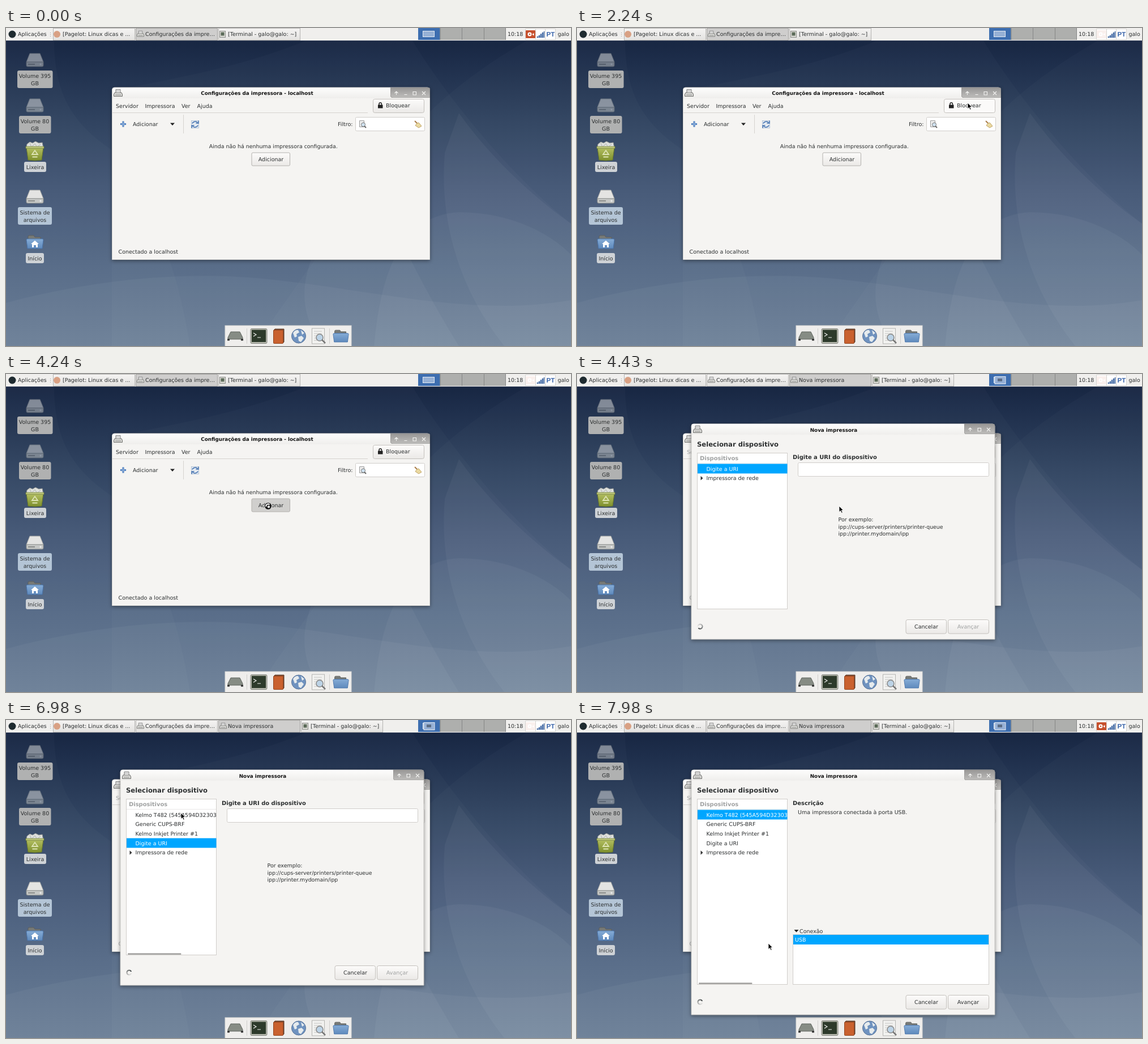
An HTML page for the animation above (8000 ms loop, 998 px wide and 561 px high).

```html
<!DOCTYPE html>
<html lang="pt">
<head>
<meta charset="utf-8">
<title>Configurações da impressora</title>
<style>
html, body { margin: 0; width: 100%; height: 100%; overflow: hidden; }
svg { display: block; }
#stage { width: 100vw; height: 100vh; }
text { font: 9.5px "DejaVu Sans", sans-serif; fill: #2c2f30; text-rendering: geometricPrecision; white-space: pre; }
.mid { text-anchor: middle; }
.title { font-size: 8.77px; font-weight: bold; fill: #111; text-anchor: middle; }
.bold { font-size: 9.95px; font-weight: bold; }
.big { font-size: 11.6px; font-weight: bold; }
.small { font-size: 9.35px; }
.window { filter: drop-shadow(0 2px 3px rgba(0,0,0,.4)); }
.button { fill: url(#buttonFill); stroke: #c3c0bc; }
.field { fill: #fff; stroke: #d0cdca; }
.line { fill: none; stroke: #d5d2cf; }
.task { fill: url(#panelFill); stroke: #b4b3b1; }
.pressed { fill: #cfcecd; stroke: #a3a2a0; }
.disabled text { fill: #a3a5a5; }
text.off { fill: #a0a2a2; }
text.on { fill: #fff; }
.mark { fill: none; stroke: #f4f4f2; stroke-width: 1.1; }
.shade path { fill: #fff; opacity: .04; }
.shade .faint { opacity: .02; }
</style>
</head>
<body>
<svg id="stage" viewBox="0 0 998 561" preserveAspectRatio="none">
<defs>
  <linearGradient id="sky" x2="0" y2="1">
    <stop offset="0" stop-color="#14223d"/><stop offset=".1" stop-color="#1d2d4a"/>
    <stop offset=".3" stop-color="#314461"/><stop offset=".5" stop-color="#435775"/>
    <stop offset=".75" stop-color="#566a87"/><stop offset="1" stop-color="#677b94"/>
  </linearGradient>
  <linearGradient id="panelFill" x2="0" y2="1"><stop stop-color="#f5f4f3"/><stop offset="1" stop-color="#e3e2e0"/></linearGradient>
  <linearGradient id="buttonFill" x2="0" y2="1"><stop stop-color="#fcfbfa"/><stop offset="1" stop-color="#ebe9e7"/></linearGradient>
  <linearGradient id="titleFill" x2="0" y2="1"><stop stop-color="#fdfdfc"/><stop offset="1" stop-color="#efeeec"/></linearGradient>
  <linearGradient id="controlFill" x2="0" y2="1"><stop stop-color="#989796"/><stop offset="1" stop-color="#bebdbb"/></linearGradient>
  <linearGradient id="folderFill" x2="0" y2="1"><stop stop-color="#85acd6"/><stop offset="1" stop-color="#5f8abd"/></linearGradient>
  <linearGradient id="binFill" x2="0" y2="1"><stop stop-color="#b4bf62"/><stop offset="1" stop-color="#7d8f2c"/></linearGradient>

  <symbol id="printer" viewBox="0 0 16 16" width="16" height="16" overflow="visible">
    <path d="M4 7V1.500h8V7" fill="#fff" stroke="#777"/>
    <path d="M2 7h12l1.500 3v3.500h-15V10z" fill="#d8d8d5" stroke="#6e6f6c"/>
    <path d="M3 11h10M4 4h7" stroke="#888"/>
  </symbol>
  <symbol id="drive" viewBox="0 0 32 26" width="32" height="26">
    <path d="M7 1h18l6 15H1z" fill="#e4e4e2" stroke="#a4a6a4"/>
    <path d="M1 16h30v6q0 2-2 2H3q-2 0-2-2z" fill="#c6c8c6" stroke="#8d908e"/>
    <path d="M4 20h12" stroke="#8a8c8a" stroke-width="2"/><circle cx="26" cy="20" r="1.500" fill="#eee"/>
  </symbol>
  <symbol id="folder" viewBox="0 0 32 28" width="32" height="28">
    <path d="M4 21V4q0-2 2-2h8l2 3h10v16z" fill="#777a77" stroke="#5c5e5c"/>
    <path d="M1 10q0-2 2-2h26q2 0 2 2l-2 15H3z" fill="url(#folderFill)" stroke="#4a74aa"/>
  </symbol>
  <symbol id="controls" viewBox="0 0 70 18" width="70" height="18">
    <path d="M0 0h66q4 0 4 4v14H5q-5 0-5-5z" fill="url(#controlFill)" stroke="#8f8e8c"/>
  </symbol>
</defs>

<rect width="998" height="561" fill="url(#sky)"/>
<g class="shade">
  <path class="faint" d="M0 22H85C86 110 112 165 187 215C250 300 300 400 325 561H0z"/>
  <path class="faint" d="M187 110C330 85 440 60 530 22H718C770 110 890 260 998 345V561H187z"/>
  <path class="faint" d="M920 22C820 80 730 150 660 250C560 390 500 470 440 561H998V22z"/>
  <path d="M0 485C150 445 320 425 480 445C660 465 830 510 998 480V561H0z"/>
  <path d="M650 561C660 450 690 330 800 325C900 325 970 370 998 400V561z"/>
  <path d="M640 240C690 370 750 480 800 561H560C500 480 520 400 640 240z"/>
  <path d="M775 220C765 340 800 460 880 561H998V345C920 290 850 220 800 150z"/>
</g>

<!-- desktop icons -->
<g>
  <use href="#drive" x="35" y="44" opacity=".5"/><use href="#drive" x="35" y="124" opacity=".5"/><use href="#drive" x="35" y="285"/>
  <rect x="20" y="75" width="62.500" height="31" rx="3" fill="#b0b1b1"/>
  <rect x="23" y="155" width="56.500" height="31" rx="3" fill="#b0b1b1"/>
  <rect x="32" y="236" width="39" height="18" rx="3" fill="#ced2d6"/>
  <rect x="21" y="316" width="60" height="31" rx="3" fill="#b4c5d6"/>
  <rect x="35" y="397" width="32" height="18" rx="3" fill="#ced2d6"/>
  <text class="mid" x="51" y="87.500">Volume 395</text><text class="mid" x="51" y="100.500">GB</text>
  <text class="mid" x="51" y="168">Volume 80</text><text class="mid" x="51" y="181">GB</text>
  <text class="mid" x="51.500" y="248.500">Lixeira</text>
  <text class="mid" x="51" y="329">Sistema de</text><text class="mid" x="51" y="341.500">arquivos</text>
  <text class="mid" x="51" y="409.500">Início</text>
  <path d="M36 212l1-7 5-4 5 2 5-3 6 3 6-1 2 10z" fill="#dfe1de" stroke="#979a96"/>
  <path d="M42 203l3 7 6-6 4 6 6-5" fill="none" stroke="#aeb1ad"/>
  <path d="M36 211h30l-3 22q-12 2-24 0z" fill="url(#binFill)" stroke="#66742b"/>
  <path d="M35 209h32v3.500H35z" fill="#b9c279" stroke="#77843a" stroke-width=".7"/>
  <path d="M46 223l5-7 5 7zM46.500 227.500h9" fill="none" stroke="#dde3b4" stroke-width="1.800"/>
  <use href="#folder" x="35" y="364"/>
  <path d="M44 381l7-6 7 6h-2v6h-3v-4h-4v4h-3v-6z" fill="#fff"/>
</g>

<!-- dock -->
<g>
  <rect x="387" y="525" width="223" height="38" fill="#efeeec" stroke="#d8d7d5"/>
  <path d="M425.500 530v27M571.500 530v27" stroke="#cfcecc"/>
  <path d="M397 536h16l5 10v3h-26v-3z" fill="#868c84" stroke="#5f645e"/><path d="M391 550h4m20 0h4" stroke="#333" stroke-width="3"/>
  <rect x="432" y="530.500" width="29" height="26" rx="2" fill="#b9bbb0" stroke="#80827c"/>
  <rect x="434" y="532.500" width="25" height="21.500" fill="#2d3a2b"/>
  <path d="M437 538l5 3-5 3M444 546h6" class="mark"/>
  <path d="M473 533l2-2h16v23l-2 2z" fill="#7c4a30" stroke="#5d3a28"/><rect x="472.500" y="533" width="17" height="23.500" rx="1" fill="#c9612f" stroke="#93451f"/>
  <circle cx="517" cy="543.500" r="12.500" fill="#6f92bf" stroke="#587397"/>
  <path d="M507 538q4-6 9-5l2 4-5 3 1 4-4 2zM516 545l6-2 4 4-5 7-4-2zM521 533l6 5-4 3z" fill="#e6ebed"/>
  <rect x="540.500" y="530" width="22" height="27" fill="#f2f2f0" stroke="#b3b4b1"/>
  <path d="M544 535h14M544 539h14M544 543h4M544 547h4M544 551h6" stroke="#c4c4c2"/>
  <circle cx="554" cy="546" r="6" fill="#bcd3e6" stroke="#888" stroke-width="1.500"/><path d="M558 550l6 6" stroke="#777" stroke-width="2.500"/>
  <use href="#folder" x="577" y="530" width="29"/>
</g>

<!-- top panel -->
<g>
  <rect width="998" height="22" fill="#f0efed"/><path d="M0 22.500h998" stroke="#38455f"/>
  <circle cx="11" cy="11" r="6.500" fill="#1f2b30"/>
  <text x="21" y="14">Aplicações</text>
  <path d="M78.500 8v8" stroke="#999" stroke-dasharray="1 2"/>
  <rect class="task" x="83.500" y=".5" width="144" height="21"/><circle cx="90" cy="11" r="6" fill="#d9a184"/>
  <text x="100" y="14">[Pagelot: Linux dicas e ...</text>
  <rect id="settingsTask" class="task" x="229.500" y=".5" width="144" height="21"/><use href="#printer" x="231" y="4" width="13" height="13"/>
  <text x="246" y="14">Configurações da impre…</text>
  <g id="newTask">
    <rect class="task pressed" x="375.500" y=".5" width="144" height="21"/><use href="#printer" x="377" y="4" width="13" height="13"/>
    <text x="392" y="14">Nova impressora</text>
  </g>
  <g id="terminalTask">
    <rect class="task" x="375.500" y=".5" width="144" height="21"/>
    <rect x="377.500" y="5.500" width="10" height="11" fill="#dcdcd6" stroke="#8b8c88"/><rect x="379.500" y="7.500" width="6" height="6" fill="#5b6a58"/>
    <text x="392" y="14">[Terminal - galo@galo: ~]</text>
  </g>
  <rect x="728" y="0" width="154.500" height="21" fill="#aeafad"/><rect x="728" width="38.500" height="21" fill="#3d6eb0"/>
  <path d="M767 0v21M805.500 0v21M844.500 0v21M882.500 0v21" stroke="#858685"/>
  <rect x="736.500" y="5.500" width="20" height="10" fill="#96b0d5" stroke="#e3eaf3"/>
  <rect id="miniDialog" x="738" y="4.500" width="19" height="13" fill="#96b0d5" stroke="#e3eaf3"/><rect id="miniIcon" x="743" y="8" width="8" height="5" fill="#5c6d86"/>
  <text x="886" y="14">10:18</text>
  <path d="M917.500 1.500h53v19h-53zM935.500 1.500v19M952.500 1.500v19" fill="#fff" stroke="#d5d3d0"/>
  <g id="tray"><rect x="918" y="4" width="17" height="14" rx="1" fill="#c6502d"/><circle cx="925" cy="11" r="3.500" fill="#fff"/><circle cx="925" cy="11" r="1.300" fill="#c6502d"/><path d="M930 10.500l2.500-1.500v4.500l-2.500-1.500z" fill="#fff"/></g>
  <path d="M938 15h2v2h-2zM941 13h2v4h-2zM944 10.500h2v6.500h-2zM947 8h2v9h-2zM950 6h1v11h-1z" fill="#4a73ae" stroke="#3a5f94" stroke-width=".5"/>
  <text x="954.500" y="15" style="font:bold 11.500px 'Liberation Sans',sans-serif;fill:#3c66aa">PT</text>
  <text x="974.500" y="14">galo</text>
</g>

<!-- settings window -->
<g class="window" id="settings">
  <path d="M187.500 408.500V109q0-4 4-4h553q4 0 4 4v299.500z" fill="#f5f4f2" stroke="#d6d5d2"/>
  <path d="M188 124v-15q0-3.500 4-3.500h552q4 0 4 3.500v15z" fill="url(#titleFill)"/>
  <use href="#printer" x="190" y="107"/>
  <text class="title" x="443.500" y="118.300">Configurações da impressora - localhost</text>
  <use href="#controls" x="679" y="105"/>
  <path class="mark" d="M689.500 118v-6m-3 3l3-3 3 3M703.500 117.500h5M719 112.500h5.500v5.500h-5.500zM735 112l6 6m0-6l-6 6"/>
  <text x="194" y="140.500">Servidor</text><text x="245.500" y="140.500">Impressora</text><text x="310" y="140.500">Ver</text><text x="337.500" y="140.500">Ajuda</text>
  <path class="line" d="M188 149.500h451M313.500 153v33"/>
  <rect id="lockButton" class="button" x="648.500" y="125.500" width="90" height="24" rx="3"/>
  <path d="M659 136v-2a2.200 2.200 0 0 1 4.400 0v2" fill="none" stroke="#222" stroke-width="1.500"/><rect x="657" y="135.500" width="8.500" height="6" fill="#222"/>
  <text x="671" y="140">Bloquear</text>
  <path d="M202 169.500h10M207 164.500v10" stroke="#3b6fb5" stroke-width="3"/><path d="M203 169.500h8M207 165.500v8" stroke="#a9c7ea"/>
  <text x="224" y="172.500">Adicionar</text><path d="M290 167.500h8l-4 4.500z" fill="#222"/>
  <rect x="327.500" y="163.500" width="13" height="13" fill="#e4eaf1" stroke="#9fb4cf" stroke-width=".7"/>
  <path d="M329 168.500a5.500 5 0 0 1 9.500-1.500M339 171.500a5.500 5 0 0 1-9.500 1.500M340 163.500v4.500h-4.500M328 176.500v-4.500h4.500" fill="none" stroke="#4573b0" stroke-width="1.500"/>
  <text x="586" y="172.500">Filtro:</text><rect class="field" x="617.500" y="157.500" width="122" height="24" rx="2"/>
  <path d="M624.500 163.500h8v11h-8z" fill="#eee" stroke="#999"/><circle cx="631" cy="170.500" r="3.500" fill="#cfe1ef" stroke="#777"/><path d="M633 173l3 3" stroke="#666" stroke-width="2"/>
  <path d="M722 164l5 5" stroke="#a87a45" stroke-width="2"/><path d="M726 168l3-1 5 6-5 3-6-4z" fill="#ead9a0" stroke="#c0a468"/>
  <text style="font-size:9.42px" x="358.800" y="212">Ainda não há nenhuma impressora configurada.</text>
  <rect id="addButton" class="button" x="434" y="220" width="67.500" height="23" rx="2" style="stroke:#b3b1ae"/>
  <text class="mid" x="468" y="234.500">Adicionar</text>
  <text x="198.500" y="397.500">Conectado a localhost</text>
</g>

<!-- new printer dialog -->
<g id="dialog">
  <path id="frame" class="window" fill="#f5f4f2" stroke="#c8c7c4"/>
  <path d="M202.500 107V92q0-4 4-4h527q4 0 4 4v15z" fill="url(#titleFill)"/>
  <use href="#printer" x="205" y="90"/>
  <text class="title" x="453.500" y="101.500">Nova impressora</text>
  <svg x="684" y="88" width="54" height="18" viewBox="0 0 70 18" preserveAspectRatio="none"><use href="#controls"/></svg>
  <path class="mark" d="M694.500 101v-6m-3 3l3-3 3 3M708 95.500h5.500v5.500h-5.500zM724 95l6 6m0-6l-6 6"/>
  <text class="big" x="212" y="128">Selecionar dispositivo</text>
  <rect id="listBox" class="field" x="212.500" y="139.500" width="159" height="275"/>
  <text class="bold off" x="217" y="152">Dispositivos</text><path class="line" d="M213 157.500h158" opacity=".5"/>
  <rect id="selection" x="213" width="158.500" height="17" fill="#00a6ff"/>
  <svg width="372" height="500">
    <g id="found">
      <text id="firstItem" x="228.500" y="170.500">Kelmo T482 (545A594D323037</text>
      <text x="228.500" y="187.200">Generic CUPS-BRF</text><text x="228.500" y="204">Kelmo Inkjet Printer #1</text>
    </g>
    <g id="rest"><text id="uriItem" x="228.500" y="170.500">Digite a URI</text>
      <text x="228.500" y="187.200">Impressora de rede</text><path d="M218.500 180v7.500l4-3.700z" fill="#333"/></g>
  </svg>
  <g id="uriPage">
    <text class="bold" x="381" y="149.500">Digite a URI do dispositivo</text><rect class="field" x="390.500" y="156.500" width="337" height="24" rx="2"/>
    <text x="461.500" y="260">Por exemplo:</text><text class="small" x="461.500" y="272.500">ipp://cups-server/printers/printer-queue</text><text class="small" x="461.500" y="285">ipp://printer.mydomain/ipp</text>
  </g>
  <g id="usbPage">
    <text class="bold" x="381" y="149.500">Descrição</text><text x="390" y="166">Uma impressora conectada à porta USB.</text>
    <path d="M383.500 370h8l-4 4.500z" fill="#222"/><text x="393" y="375.500">Conexão</text>
    <rect class="field" x="381.500" y="378.500" width="346" height="88"/><rect x="382" y="379" width="345" height="17" fill="#00a6ff"/>
    <text class="on" x="385" y="391">USB</text>
  </g>
  <g id="foot">
    <rect id="scrollbar" x="215" y="411.500" width="94.500" height="2.300" rx="1" fill="#999896"/>
    <g id="spinner" fill="none" stroke="#2e3436" stroke-width="2"></g>
    <rect class="button" x="581" y="433.500" width="71.500" height="24.500" rx="3"/><text class="mid" x="617" y="448.500">Cancelar</text>
    <rect class="button" x="655.500" y="433.500" width="72" height="24.500" rx="3"/><text id="next" class="mid" x="691" y="448.500">Avançar</text>
  </g>
</g>

<path id="arrow" d="M0 0V10.500L2.500 8.200L4.400 12.200L6.200 11.400L4.300 7.500H7.500z" fill="#000" stroke="#fff" stroke-width=".8"/>
<g id="busy" transform="translate(463 233)"><circle r="6.300" fill="#111" stroke="#fff" stroke-width=".7"/><path d="M-3.500 1A3.600 3.600 0 0 1 2.500-2.500" fill="none" stroke="#fff" stroke-width="2"/><circle r="2.200" cx="1" cy="1.200" fill="#e5e5e5"/></g>
</svg>

<script>
const $ = id => document.getElementById(id);
const show = (id, visible) => $(id).style.display = visible ? '' : 'none';
const shift = (id, x, y) => $(id).setAttribute('transform', `translate(${x} ${y})`);
const attr = (id, name, value) => $(id).setAttribute(name, value);

const LOOP = 8000;
const BLINKS = [760, 1540, 2240, 3030, 3800, 4560, 5320, 6080, 6840, 7600];
const PRESS = 4130, OPEN = 4360, FOUND = 5030, PICK = 7180;

// time, x, y, and whether the move into this point is eased
const PATH = [
  [760, 301, 345], [1540, 559, 290], [2190, 690, 132], [2500, 690, 132],
  [2980, 464, 231, 1], [3619, 464, 231], [3620, 463, 233], [4450, 463, 233],
  [5250, 190, 192, 1], [5580, 226, 183, 1], [5800, 226, 183],
  [6450, 309, 164, 1], [7250, 309, 164], [7900, 338, 394, 1], [LOOP, 338, 394]
];

function pointer(t) {
  const i = Math.max(1, PATH.findIndex(p => p[0] > t));
  const [t0, x0, y0] = PATH[i - 1], [t1, x1, y1, eased] = PATH[i];
  let k = Math.max(0, (t - t0) / (t1 - t0));
  if (eased) k = k * k * (3 - 2 * k);
  return [x0 + (x1 - x0) * k, y0 + (y1 - y0) * k];
}

// spinner ring: short arcs that fade towards the tail
const SEGMENTS = 16;
for (let i = 0; i < SEGMENTS; i++) {
  const point = a => `${4 * Math.cos(a)} ${4 * Math.sin(a)}`;
  const a = (i / SEGMENTS - .8) * 2 * Math.PI;
  const arc = document.createElementNS('http://www.w3.org/2000/svg', 'path');
  arc.setAttribute('d', `M${point(a)}A4 4 0 0 1 ${point(a + .42)}`);
  arc.setAttribute('opacity', (i / SEGMENTS) ** 1.3);
  $('spinner').append(arc);
}

function draw(t) {
  const open = t >= OPEN, found = t >= FOUND, picked = t >= PICK;
  const grow = picked ? 52 : 0;
  const [x, y] = pointer(t);
  const busy = t >= 4190 && !open;
  const inside = id => {
    const b = $(id).getBBox();
    return t >= 760 && x > b.x && x < b.x + b.width && y > b.y && y < b.y + b.height;
  };

  show('arrow', t >= 760 && !busy);
  show('busy', busy);
  shift('arrow', x, y);
  $('tray').style.opacity = BLINKS.filter(b => b <= t).length % 2 ? .08 : 1;

  $('lockButton').style.fill = inside('lockButton') ? '#fbfaf9' : '';
  $('addButton').style.fill = t >= PRESS ? '#d0cfcd' : inside('addButton') ? '#fbfaf9' : '';
  attr('settings', 'class', open ? 'window disabled' : 'window');
  attr('settingsTask', 'class', open ? 'task' : 'task pressed');
  for (const id of ['dialog', 'newTask', 'miniDialog', 'miniIcon']) show(id, open);
  shift('terminalTask', open ? 146 : 0, 0);

  attr('frame', 'd', `M202 ${468 + grow}V92q0-4 4-4h528q4 0 4 4v${376 + grow}z`);
  attr('listBox', 'height', 275 + grow);
  show('found', found);
  shift('rest', 0, found ? 50.2 : 0);
  attr('selection', 'y', found && !picked ? 208.5 : 158.5);
  attr('uriItem', 'class', picked ? '' : 'on');
  attr('firstItem', 'class', picked ? 'on' : '');
  show('uriPage', !picked);
  show('usbPage', picked);
  shift('foot', 0, grow);
  attr('next', 'class', picked ? 'mid' : 'mid off');
  $('scrollbar').style.opacity = Math.min(1, Math.max(0, (t - 5500) / 200));
  attr('spinner', 'transform', `translate(217.5 445.5) rotate(${(t - 5580) * .36 + 120})`);
}

function tick(now) {
  draw(now % LOOP);
  requestAnimationFrame(tick);
}
tick(performance.now());
</script>
</body>
</html>
```
